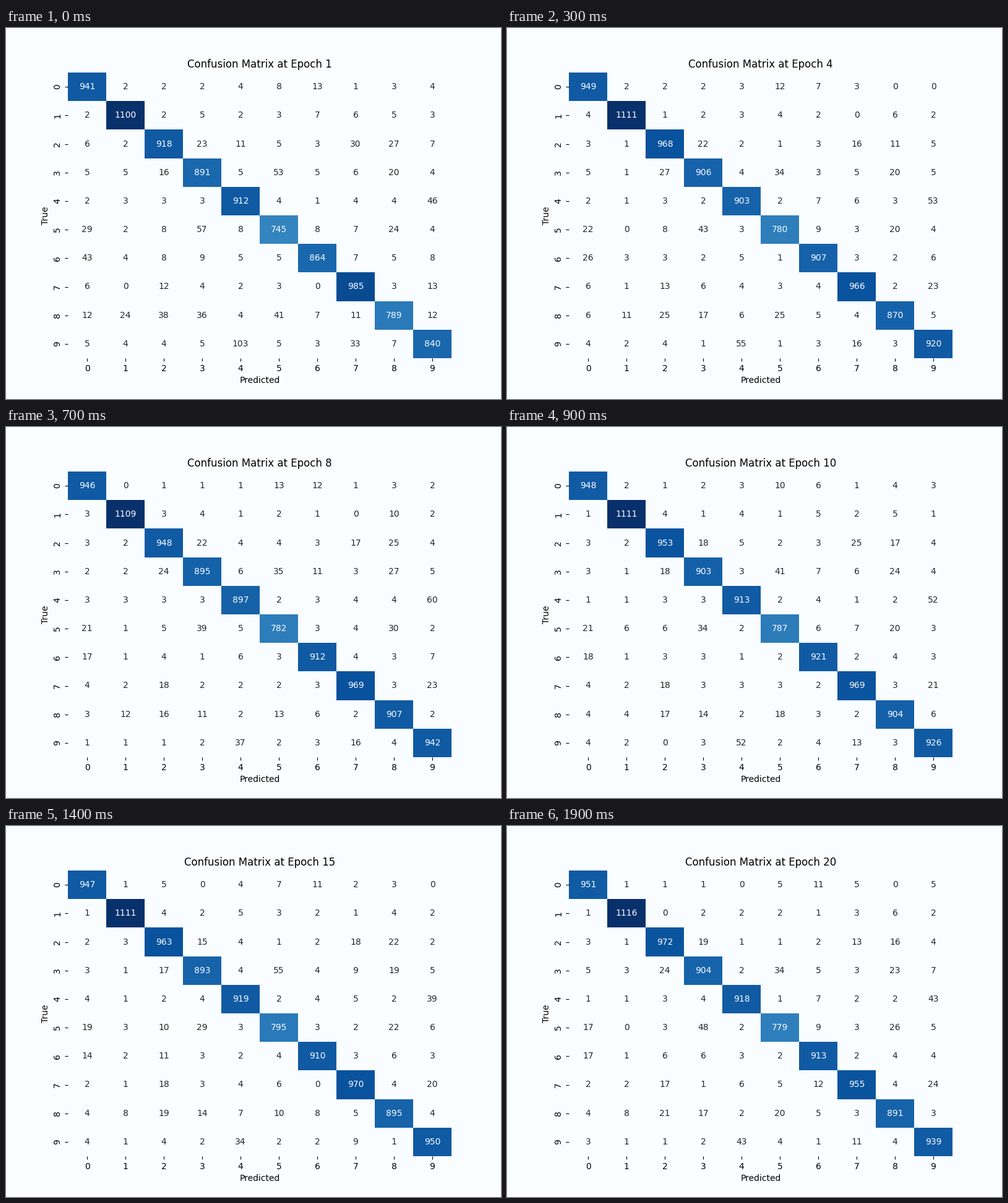
Recreate the animation shown at these times as a matplotlib script. Size 800x600 px, loop 2000 ms.

```python
import numpy as np
import matplotlib.pyplot as plt
from matplotlib.animation import FuncAnimation

EPOCHS, N = 20, 10
BG = np.array([249, 253, 255]) / 255
INK = "#262626"

# Test images per digit, and how many are right at first and once settled
TOTALS = np.array([980, 1135, 1032, 1010, 982, 892, 958, 1028, 974, 1009])
START = np.array([941, 1100, 918, 891, 912, 745, 864, 985, 789, 840])
SETTLED = np.array([952, 1113, 960, 900, 915, 785, 917, 962, 900, 930])

# Pairs of digits that are easily mixed up
LOOKALIKES = {(4, 9): 15, (3, 5): 8, (2, 3): 4, (2, 7): 4, (2, 8): 4, (3, 8): 4,
              (5, 8): 4, (7, 9): 4, (0, 6): 4, (0, 5): 3, (1, 8): 2}


def confusion_weights():
    weights = np.ones((N, N))
    weights[:, 1] = 0.5
    for (a, b), extra in LOOKALIKES.items():
        weights[a, b] += extra
        weights[b, a] += extra
    np.fill_diagonal(weights, 0)
    return weights / weights.sum(axis=1, keepdims=True)


WEIGHTS = confusion_weights()


def matrix_at(epoch):
    """Hits settle quickly with some jitter; misses go to similar digits."""
    rng = np.random.default_rng(epoch)
    t = 1 - np.exp(-(epoch - 1) / 1.5)
    hits = START + t * (SETTLED - START)
    hits += t * 0.12 * (TOTALS - hits) * rng.normal(size=N)
    hits = np.rint(hits).astype(int)
    return rng.multinomial(TOTALS - hits, WEIGHTS) + np.diag(hits)


def limit_palette(rgb, step=32):
    """Replace colours by the mean of all that share a coarse RGB bucket."""
    _, group = np.unique(rgb // step, axis=0, return_inverse=True)
    group = group.ravel()
    return np.array([rgb[group == g].mean(axis=0) for g in group])


def diagonal_colours(matrix):
    rgb = plt.get_cmap("Blues")(matrix.diagonal() / matrix.max())[:, :3]
    return limit_palette(np.rint(rgb * 255)) / 255


fig, ax = plt.subplots(figsize=(8, 6), dpi=100, facecolor=BG)
ax.set_facecolor(BG)
ax.spines[:].set_visible(False)

edges = np.arange(N + 1)
mesh = ax.pcolormesh(edges, edges, np.tile(BG, (N, N, 1)), linewidth=0)
ax.set(xlim=(0, N), ylim=(N, 0), xlabel="Predicted", ylabel="True")
ax.set_xticks(np.arange(N) + 0.5, range(N))
ax.set_yticks(np.arange(N) + 0.5, range(N), rotation="vertical", va="center")
title = ax.set_title("")
labels = [[ax.text(c + 0.5, r + 0.5, "", ha="center", va="center",
                   color=BG if r == c else INK)
           for c in range(N)] for r in range(N)]


def draw(i):
    matrix = matrix_at(i + 1)
    cells = np.tile(BG, (N, N, 1))
    cells[range(N), range(N)] = diagonal_colours(matrix)
    mesh.set_array(cells)
    for row, values in zip(labels, matrix):
        for label, value in zip(row, values):
            label.set_text(str(value))
    title.set_text(f"Confusion Matrix at Epoch {i + 1}")


anim = FuncAnimation(fig, draw, frames=EPOCHS, init_func=lambda: draw(0),
                     interval=100, repeat=True, repeat_delay=0)
plt.show()
```
